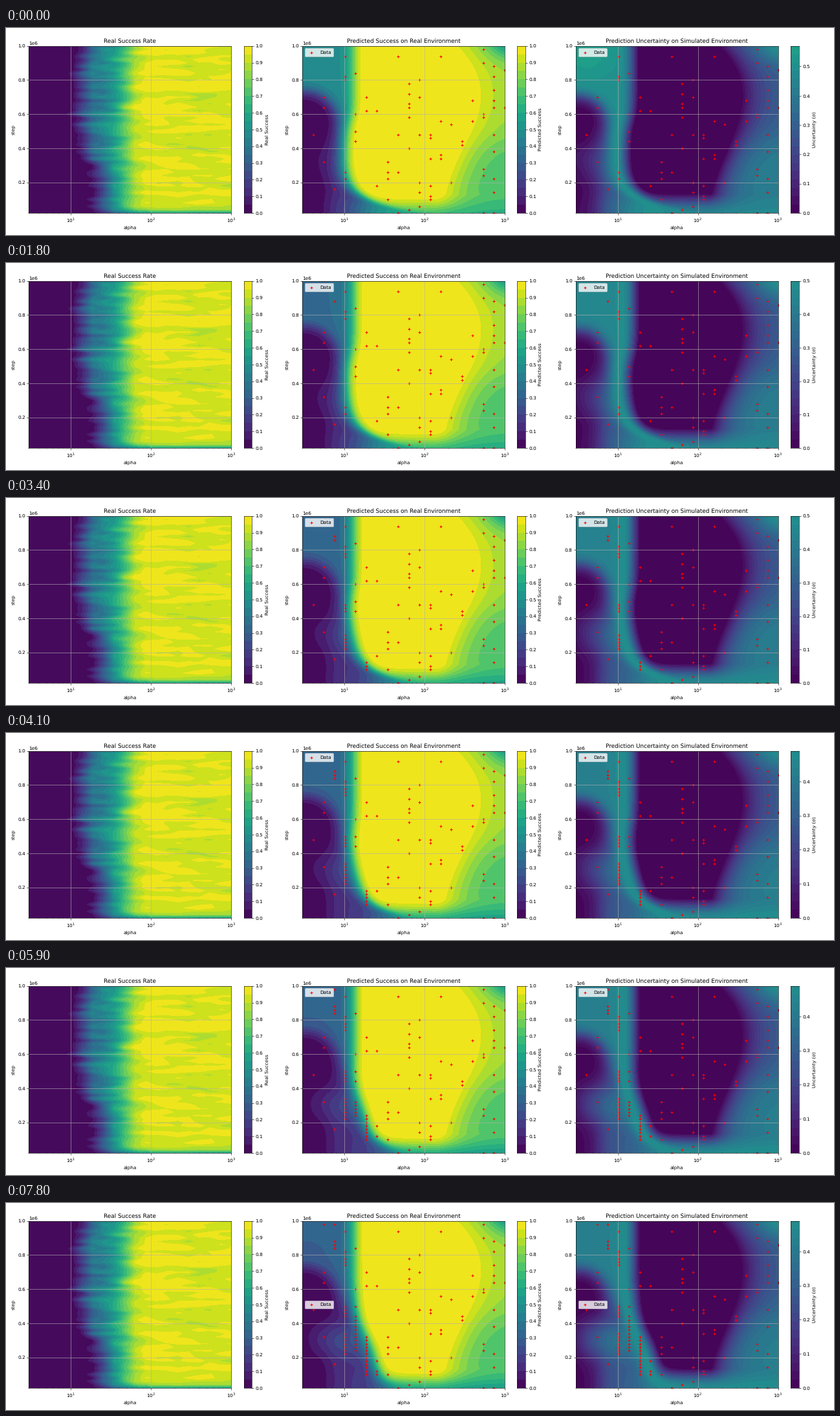
Animation of 1280 by 320 pixels, one loop 8000 ms. Source, as a matplotlib script:

```python
import numpy as np
import matplotlib.pyplot as plt
from matplotlib.animation import FuncAnimation

plt.rcParams["text.hinting"] = "none"

W, H = 1280, 320
FRAMES, LAST = 80, 78
A_MIN, A_MAX = 3, 1000
COLS, ROWS = 20, 50
AX_X, AX_Y, AX_W, AX_H, PITCH = 35.4, 27.75, 312.6, 258.3, 422.75
BAR_DX, BAR_W = 332.1, 12.9
PANEL_X = AX_X + PITCH

# Later samples climb the success boundary:
# column, first row, last row, first frame, last frame.
RUNS = [
    (3, 44, 42, 4, 36), (4, 39, 37, 8, 36), (4, 11, 17, 18, 41),
    (4, 22, 25, 20, 40), (6, 5, 16, 19, 78), (5, 12, 21, 42, 78),
    (7, 6, 5, 50, 74), (3, 49, 49, 47, 47), (2, 49, 49, 76, 76),
]
LEGEND_MOVE = 76


def alpha_at(u):
    return A_MIN * (A_MAX / A_MIN) ** u


def sigmoid(x):
    return 1 / (1 + np.exp(-x))


def smoothstep(x):
    x = np.clip(x, 0, 1)
    return x * x * (3 - 2 * x)


def bell(x, y, cx, cy, sx, sy):
    return np.exp(-((x - cx) / sx) ** 2 - ((y - cy) / sy) ** 2)


def mix(a, b, t):
    return a + (b - a) * t


def prediction(x, y, i):
    """Success probability at stage pixels x, y."""
    upper = 1 - np.exp(-i / 14)
    edge = (i / LAST) ** 1.35
    lower = smoothstep(i / 55)

    # Failure side: upper plateau around a dark disc, ridge below, floor strip.
    disc = np.exp(-(np.hypot(x - 462, y - 147) / 52) ** 6)
    fail = mix(.47, .3, upper) * (1 - disc) * sigmoid((150 - y) / 15)
    fail += (mix(.03, .11, edge) * sigmoid((x - 472) / 8)
             * np.exp(-((y - 212) / 26) ** 2))
    fail += .13 * sigmoid((x - 500) / 8) * sigmoid((y - 190) / 10)
    fail += (mix(.48, .38, lower) * sigmoid((x - mix(550, 585, lower)) / 18)
             * sigmoid((y - 262) / 6))

    # Signed distance into the success side, from the left wall and the floor.
    wall = (537 - 16 * (1 - edge) * sigmoid((y - 145) / 12)
            + 30 * edge * sigmoid((y - 200) / 15)
            + mix(140, 40, edge) * np.exp((y - 287) / 18))
    inside = -np.logaddexp((wall - x) / 7, (y - 277) / 7)
    p = fail + (1.04 - fail) * sigmoid(inside)

    # Decline towards large alpha.
    start = np.polyval(np.polyfit([30, 120, 200, 255],
                                  [680, 712, 686, 667], 3), y)
    t = np.clip((x - start) / 40, 0, None)
    loss = (.16 + .14 * sigmoid((y - 175) / 14)) * (1 - np.exp(-t ** 1.5))
    loss += .5 * bell(x, y, 790, 15, 40, 28)
    return np.clip(np.minimum(p, 1) - loss * sigmoid(inside), 0, 1)


def uncertainty(p, x, y, i):
    extra = .07 * max(0, 1 - i / 18) * bell(x, y, 475, 40, 45, 40)
    return .49 * (4 * p * (1 - p)) ** .75 + extra


def sigma_top(i):
    return .57 if i < 5 else .54 if i < 13 else .5 if i < 39 else .489


def real_success():
    rng = np.random.default_rng(7)
    c, r = np.meshgrid(np.arange(COLS), np.arange(ROWS))
    sway = np.convolve(rng.normal(0, .5, ROWS + 2), [.5, .7, .5], "valid")
    onset = 3.8 + 1.7 * sigmoid((18 - r) / 3) + .6 * sway[:, None]
    mean = (.45 * smoothstep((c - onset) / 3)
            + .5 * smoothstep((c - 7 - .4 * sway[:, None]) / 4))
    noise = rng.normal(0, 1, (ROWS, COLS + 2))
    noise = (noise[:, :-2] + noise[:, 1:-1] + noise[:, 2:]) / 3 ** .5
    noise *= .03 + .1 * mean * (1 - mean)
    fade = 1 - .42 * np.exp(-r / .8)
    return np.clip((mean + noise * (mean > .01)) * fade, 0, 1)


def samples():
    rng = np.random.default_rng(4)
    free = [(0, c, n) for c in range(1, COLS) for n in range(1, ROWS)
            if c > 3 or n < 36]
    pts = [free[k] for k in rng.choice(len(free), 74, replace=False)]
    for col, first, last, begin, end in RUNS:
        n = abs(last - first) + 1
        pts += zip(np.linspace(begin, end, n).round(), [col] * n,
                   np.linspace(first, last, n))
    birth, col, row = np.array(pts).T
    return birth, np.column_stack([alpha_at(col / (COLS - 1)), row * 2e4])


def place(x, w):
    return fig.add_axes([x / W, 1 - (AX_Y + AX_H) / H, w / W, AX_H / H])


def panel(k, title):
    x = AX_X + k * PITCH
    ax = place(x, AX_W)
    ax.set_xscale("log")
    ax.set(xlim=(A_MIN, A_MAX), ylim=(2e4, 1e6), title=title,
           xlabel="alpha", ylabel="step")
    ax.grid(True)
    return ax, place(x + BAR_DX, BAR_W)


def fill(ax, x, y, z, top=1):
    return ax.contourf(x, y, np.clip(z, 0, top), np.linspace(0, top, 21),
                       cmap="viridis", vmin=0, vmax=1, zorder=0)


def bar(ax, label, top=1):
    ax.clear()
    edges = np.linspace(0, top, 21)
    mids = (edges[1:] + edges[:-1]) / 2
    ax.pcolormesh([0, 1], edges, mids[:, None], cmap="viridis",
                  vmin=0, vmax=1)
    ticks = np.arange(0, top + 1e-6, .1)
    ax.set(xticks=[], yticks=ticks, ylim=(0, top))
    ax.set_yticklabels([f"{t:.1f}" for t in ticks])
    ax.yaxis.tick_right()
    ax.yaxis.set_label_position("right")
    ax.set_ylabel(label)


fig = plt.figure(figsize=(24, 6), dpi=W / 24)
real_ax, real_bar = panel(0, "Real Success Rate")
pred_ax, pred_bar = panel(1, "Predicted Success on Real Environment")
unc_ax, unc_bar = panel(2, "Prediction Uncertainty on Simulated Environment")

fill(real_ax, alpha_at(np.linspace(0, 1, COLS)),
     np.arange(1, ROWS + 1) * 2e4, real_success())
bar(real_bar, "Real Success")
bar(pred_bar, "Predicted Success")

u, v = np.linspace(0, 1, 130), np.linspace(0, 1, 108)
grid_a, grid_s = alpha_at(u), (.02 + .98 * v) * 1e6
px, py = np.meshgrid(PANEL_X + AX_W * u, AX_Y + AX_H * (1 - v))

birth, points = samples()
marks = [ax.scatter([], [], c="red", marker="+", label="Data")
         for ax in (pred_ax, unc_ax)]
legends = [ax.legend(loc="upper left") for ax in (pred_ax, unc_ax)]
fills = []


def update(frame):
    i = min(frame, LAST)
    while fills:
        fills.pop().remove()
    p, top = prediction(px, py, i), sigma_top(i)
    fills.append(fill(pred_ax, grid_a, grid_s, p))
    fills.append(fill(unc_ax, grid_a, grid_s, uncertainty(p, px, py, i), top))
    bar(unc_bar, "Uncertainty (σ)", top)
    for mark, legend in zip(marks, legends):
        mark.set_offsets(points[birth <= i])
        legend.set_loc("upper left" if i < LEGEND_MOVE else "center left")
    return fills + marks


anim = FuncAnimation(fig, update, frames=FRAMES, interval=100, repeat=True,
                     repeat_delay=0)
plt.show()
```
